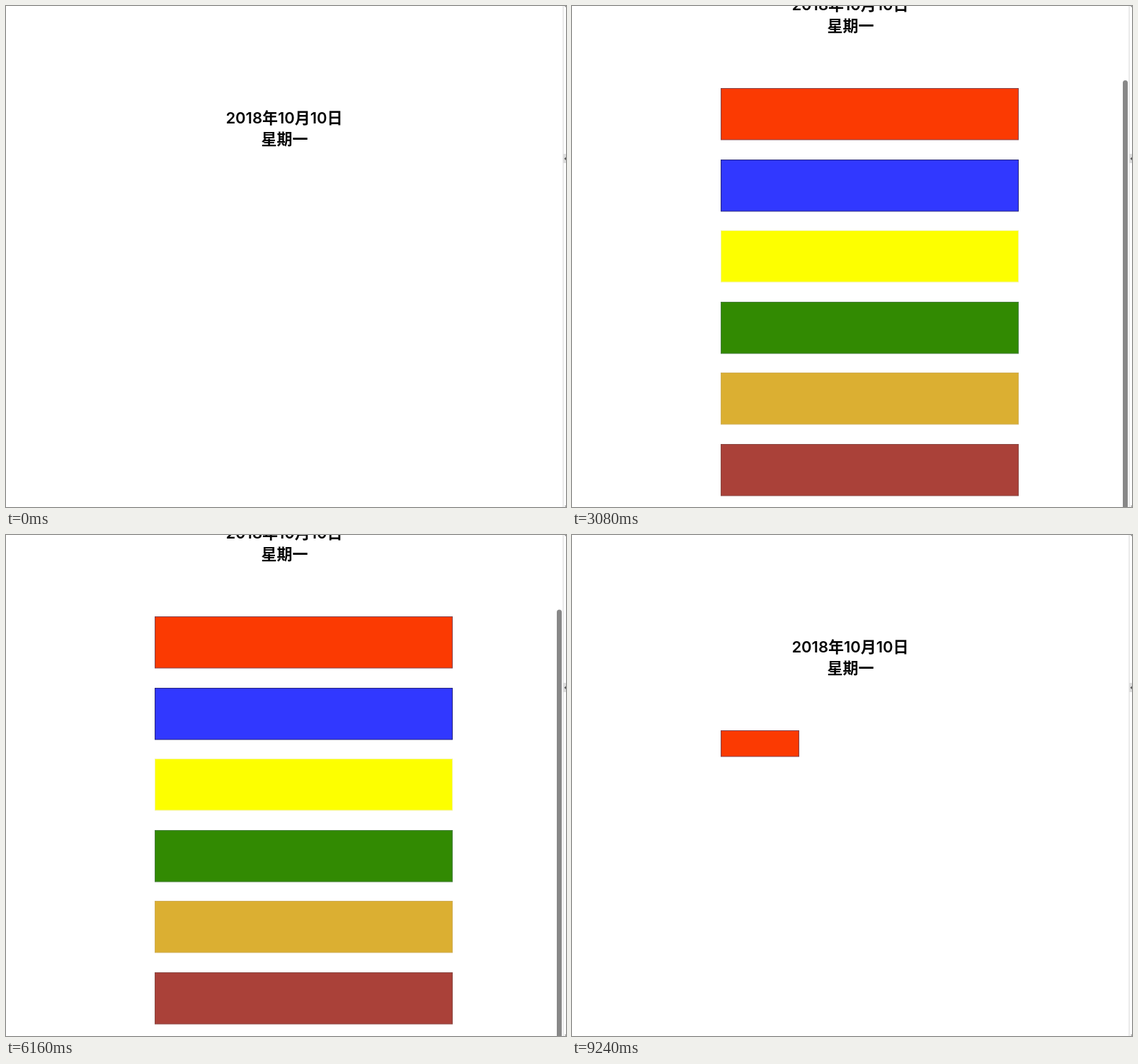
These frames come from a looping animation (791 px wide and 708 px high, 9310 ms). An HTML page:

```html
<!DOCTYPE html>
<html lang="zh-CN">
<head>
<meta charset="utf-8">
<title>Colour bars</title>
<style>
  html, body { margin: 0; width: 100%; height: 100%; overflow: hidden; background: #fff; }
  svg { display: block; width: 100vw; height: 100vh; }
  text {
    font: 600 22px Inter, "Noto Sans CJK SC", "Noto Sans CJK", sans-serif;
    text-anchor: middle;
    fill: #050505;
  }
</style>
</head>
<body>
<svg viewBox="0 0 791 708" xmlns="http://www.w3.org/2000/svg">
  <rect width="791" height="708" fill="#fff"/>
  <g id="title">
    <text x="393" y="166">2018年10月10日</text>
    <text x="393.5" y="196">星期一</text>
  </g>
  <g id="bars"></g>
  <rect id="thumb" x="778" width="7" height="620" rx="3.5" fill="#888"/>
  <g id="edge">
    <rect x="787" width="4" height="708" fill="#fdfdfd"/>
    <path d="M787 0V708" stroke="#d6d6d6"/>
    <rect x="787" y="209" width="4" height="13" fill="#dcdcdc"/>
    <path d="M791 213.5V218L788.5 215.8Z" fill="#555"/>
    <path d="M789 0h2v2ZM789 706h2v2Z" fill="#888"/>
  </g>
</svg>
<script>
const LOOP = 9310, STEP = 70;
const GROW = 860, HEIGHT_SHARE = 0.62;
const OPEN_AT = 224, OPEN_GAP = 338;
const BAR = { x: 210, y: 276, w: 420, h: 73, pitch: 100.6 };
const SCROLL_END = 148, SCROLL_PEAK = 161, MIRROR = 9170;

// fill, outline, time at which the bar has closed
const STYLES = [
  ["#fb3a02", "#84424a", 9399],
  ["#3138ff", "#24247c", 8970],
  ["#fdff00", "#f4f49a", 8541],
  ["#328a02", "#4a8040", 8180],
  ["#dbaf32", "#cfae58", 7819],
  ["#aa4139", "#8a4742", 7458]
];

const $ = id => document.getElementById(id);
const clamp = v => Math.max(0, Math.min(1, v));
const set = (el, attrs) => {
  for (const k in attrs) el.setAttribute(k, attrs[k]);
};

const bars = STYLES.map(([fill, stroke, closed], i) => {
  const el = document.createElementNS("http://www.w3.org/2000/svg", "rect");
  set(el, { x: BAR.x + 0.5, fill, stroke, "stroke-width": 1 });
  $("bars").appendChild(el);
  return { el, opens: OPEN_AT + i * OPEN_GAP, closed };
});

// cubic-bezier(.25, .1, .25, 1)
function ease(x) {
  if (x <= 0) return 0;
  if (x >= 1) return 1;
  const curve = (a, b, s) => 3 * a * s * (1 - s) ** 2 + 3 * b * s * s * (1 - s) + s ** 3;
  let lo = 0, hi = 1;
  for (let i = 0; i < 24; i++) {
    const mid = (lo + hi) / 2;
    if (curve(0.25, 0.25, mid) < x) lo = mid; else hi = mid;
  }
  return curve(0.1, 1, lo);
}

const wave = p => (1 - Math.cos(Math.PI * clamp(p))) / 2;

// Scroll down past the end, then spring back; the way up runs in reverse.
function scrollAt(t) {
  const s = t < LOOP / 2 ? t : MIRROR - t;
  if (s < 3010) return SCROLL_PEAK * wave((s - 2690) / 320);
  return SCROLL_PEAK - (SCROLL_PEAK - SCROLL_END) * wave((s - 3010) / 490);
}

function thumbOpacity(t) {
  if (t < 2730 || t >= 6510) return 0;
  return t < LOOP / 2 ? clamp((3920 - t) / 350) : clamp((t - 5530) / 210);
}

function draw(t) {
  const scroll = Math.round(scrollAt(t));
  set($("title"), { transform: `translate(0 ${-scroll})` });
  set($("thumb"), { y: scroll * 0.656, opacity: thumbOpacity(t) });

  bars.forEach(({ el, opens, closed }, i) => {
    const u = (t < LOOP / 2 ? t - opens : closed - t) / GROW;
    const w = BAR.w * ease(u), h = BAR.h * ease(u / HEIGHT_SHARE);
    set(el, {
      y: Math.round(BAR.y + BAR.pitch * i) - scroll + 0.5,
      width: Math.round(w),
      height: Math.max(0, Math.round(h) - 0.5),
      visibility: u > 0 && w >= 1 ? "visible" : "hidden"
    });
  });
}

const start = performance.now();
function tick() {
  const t = (performance.now() - start) % LOOP;
  draw(Math.floor(t / STEP) * STEP);
  requestAnimationFrame(tick);
}
tick();
</script>
</body>
</html>
```
